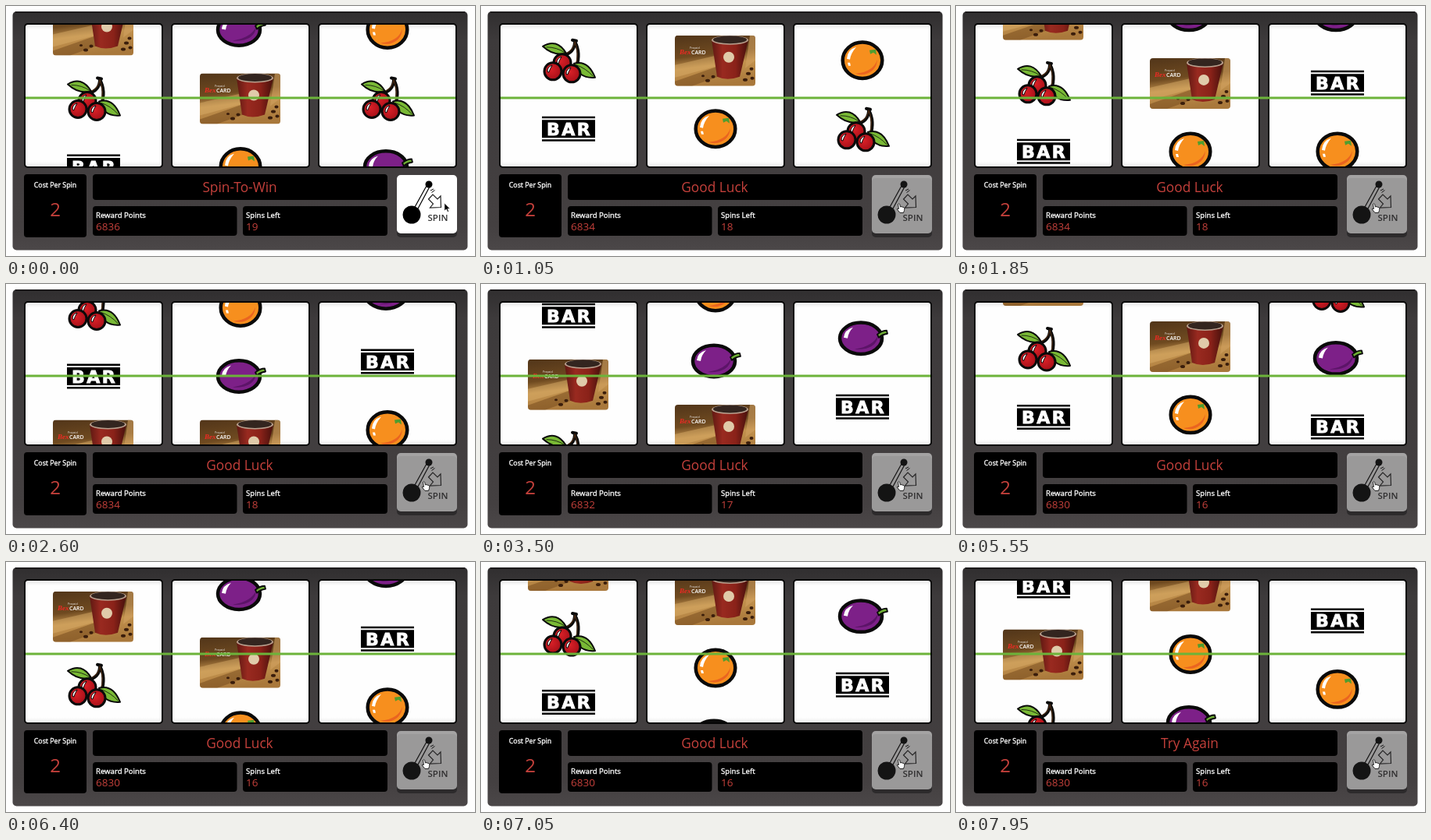
These frames come from a looping animation (600 px wide and 321 px high, 8000 ms). An HTML page:

```html
<!DOCTYPE html>
<html lang="en">
<head>
<meta charset="utf-8">
<title>Slot machine</title>
<style>
  html, body { margin: 0; width: 100%; height: 100%; overflow: hidden; background: #fefefe; }
  svg { display: block; width: 600px; height: 321px; }
  text { font-family: "Open Sans", sans-serif; }
  .label { fill: #fff; stroke: #fff; stroke-width: .35; font-size: 9.6px; }
  .value { fill: #c4403b; font-size: 13.5px; }
  .mid { text-anchor: middle; }
  .ink { stroke: #0a0a0a; stroke-linejoin: round; stroke-linecap: round; }
</style>
</head>
<body>
<svg viewBox="0 0 600 321">
  <defs>
    <linearGradient id="metal" x2="0" y2="1">
      <stop offset="0" stop-color="#302e2f"/><stop offset=".12" stop-color="#3d3a3b"/>
      <stop offset=".9" stop-color="#444041"/><stop offset="1" stop-color="#4b4748"/>
    </linearGradient>
    <linearGradient id="pane" x2="0" y2="1">
      <stop offset="0" stop-color="#e4e4e4"/><stop offset=".04" stop-color="#fefefe"/>
      <stop offset=".96" stop-color="#fefefe"/><stop offset="1" stop-color="#ebebeb"/>
    </linearGradient>
    <linearGradient id="table" x1=".2" x2=".4" y2="1">
      <stop offset="0" stop-color="#54371a"/><stop offset=".4" stop-color="#6f4a20"/>
      <stop offset=".62" stop-color="#c2924e"/><stop offset="1" stop-color="#a9783b"/>
    </linearGradient>
    <linearGradient id="paper">
      <stop offset="0" stop-color="#5e1812"/><stop offset=".3" stop-color="#992a20"/>
      <stop offset=".65" stop-color="#8a2219"/><stop offset="1" stop-color="#45100c"/>
    </linearGradient>
    <radialGradient id="red" cx=".4" cy=".4" r=".65">
      <stop offset="0" stop-color="#d92027"/><stop offset="1" stop-color="#a50f18"/>
    </radialGradient>
    <clipPath id="windows">
      <rect x="25" y="24" width="174" height="182" rx="3"/>
      <rect x="213" y="24" width="174" height="182" rx="3"/>
      <rect x="401" y="24" width="174" height="182" rx="3"/>
    </clipPath>
    <clipPath id="cardEdge"><rect x="-52" y="-32" width="103" height="65" rx="4"/></clipPath>

    <g id="bar">
      <path d="M-34-16h68v2.500h-68zM-34-11.500h68v23h-68zM-34 13.500h68V16h-68z"/>
      <text class="mid" x="1" y="8" fill="#fff" stroke="#fff" stroke-width=".9" font-size="22" font-weight="700" letter-spacing="2.500" style="font-family:'DejaVu Sans',sans-serif">BAR</text>
    </g>

    <g id="ball">
      <circle class="ink" r="11" fill="url(#red)" stroke-width="3"/>
      <path d="M-7 0Q-7-6-1-7.500Q-4-3-5 1z" fill="#fff"/>
    </g>
    <g id="cherry" class="ink">
      <path d="M-7-6Q8-10 8-24Q16-10 10 9" fill="none" stroke-width="4"/>
      <path d="M5-26L10-25" stroke-width="4"/>
      <path d="M-8-7Q7-12 8-24Q14-9 9 7" fill="none" style="stroke:#4a2a12" stroke-width="1.200"/>
      <path d="M-33-18Q-15-29-3-9Q-19-5-33-18z" fill="#79b935" stroke-width="2"/>
      <path d="M7 4Q25-1 34 22Q13 24 7 4z" fill="#79b935" stroke-width="2"/>
      <path d="M-28-17Q-15-17-5-10M10 6Q22 10 31 20" fill="none" stroke-width=".8"/>
      <use href="#ball" x="-8" y="3"/><use href="#ball" x="-20" y="14"/><use href="#ball" x="4" y="17"/>
    </g>

    <g id="orange">
      <ellipse class="ink" rx="25.300" ry="23.200" fill="#f78f1e" stroke-width="4.500"/>
      <path d="M19-1Q18 14 3 18Q-4 19-9 17Q14 15 19-1z" fill="#ea6420"/>
      <path d="M-20-2Q-19-14-8-17Q-15-9-16-1zM-19 3h3l1 4h-3z" fill="#fff"/>
      <path d="M9-13l8-1 1 7-4-3-4 2z" fill="#4f9d2f"/>
    </g>

    <g id="plum">
      <ellipse class="ink" cx="-2" rx="27" ry="20.200" fill="#7d2088" stroke-width="4.500"/>
      <path d="M20-4Q19 9 5 13Q-4 15-10 14Q14 10 20-4z" fill="#5c1468"/>
      <path d="M-24-1Q-23-11-12-14Q-18-8-19 0z" fill="#fff"/>
      <path class="ink" d="M19-5Q25-10 31-10l1 4Q25-5 21-1z" fill="#6fae35" stroke-width="1.800"/>
    </g>

    <g id="card" clip-path="url(#cardEdge)">
      <path d="M-52-32H51V33H-52z" fill="url(#table)"/>
      <path d="M-52 6L0-6V8L-52 22z" fill="#dcb06a" opacity=".45"/>
      <path d="M2 8L-52 27V33H-30L6 20z" fill="#6b4118" opacity=".45"/>
      <path d="M44-32H51V0L38 10z" fill="#d0a060" opacity=".6"/>
      <path d="M-5-26L2 21Q15 27 31 21L42-26z" fill="url(#paper)"/>
      <ellipse cx="18.500" cy="-26" rx="23.500" ry="6" fill="#b9a08e"/>
      <ellipse cx="18.500" cy="-26.500" rx="21.500" ry="5" fill="#33251f"/>
      <circle cx="17" cy="-4" r="7" fill="#e0cbaa"/>
      <g fill="#3a1d0b">
        <ellipse cx="42" cy="17" rx="3" ry="2"/><ellipse cx="46" cy="11" rx="2.500" ry="2"/>
        <ellipse cx="38" cy="25" rx="3" ry="2"/><ellipse cx="47" cy="23" rx="2.500" ry="2"/>
        <ellipse cx="-10" cy="26" rx="3" ry="2"/><ellipse cx="-3" cy="21" rx="2.500" ry="2"/>
        <ellipse cx="-16" cy="20" rx="2" ry="1.500"/>
      </g>
      <text x="-46" y="-8" font-size="9" font-weight="700" font-style="italic" fill="#ee2a24" style="font-family:'Liberation Serif',serif">Bex</text>
      <text x="-31" y="-8" font-size="7" font-weight="600" fill="#fff">CARD</text>
      <text x="-33" y="-15" font-size="3.500" fill="#eee">Prepaid</text>
    </g>
  </defs>

  <rect x="8.500" y="7" width="582" height="306.500" rx="5" fill="url(#metal)"/>
  <path d="M12 8H587" stroke="#1d1b1c" stroke-width="2"/>
  <g fill="url(#pane)" stroke="#060606" stroke-width="2">
    <rect x="24" y="23" width="176" height="184" rx="4"/>
    <rect x="212" y="23" width="176" height="184" rx="4"/>
    <rect x="400" y="23" width="176" height="184" rx="4"/>
  </g>
  <g id="reels" clip-path="url(#windows)"></g>
  <path d="M25 118H575" stroke="#6cb33a" stroke-width="3"/>

  <rect x="23" y="216" width="80" height="81" rx="4"/>
  <rect x="111" y="216" width="377" height="33" rx="4"/>
  <rect x="111" y="257" width="184.500" height="38" rx="4"/>
  <rect x="303" y="257" width="185" height="38" rx="4"/>
  <text class="label mid" x="63" y="233" style="font-size:8.8px">Cost Per Spin</text>
  <text class="value mid" x="63" y="270" style="font-size:24px">2</text>
  <text class="value mid" x="299" y="239" id="message" style="font-size:17.300px"></text>
  <text class="label" x="115" y="272">Reward Points</text>
  <text class="value" x="115" y="288" id="points"></text>
  <text class="label" x="307" y="272">Spins Left</text>
  <text class="value" x="307" y="288" id="spins"></text>

  <rect x="500" y="221" width="77" height="76" rx="5" fill="#2c2a2b"/>
  <g id="button">
    <rect x="500" y="217" width="77" height="75" rx="5" fill="#fff"/>
    <path d="M538.500 230L522 260M542.500 231L526 262" stroke="#000" stroke-width="1.200"/>
    <circle cx="541" cy="229" r="4.500"/><circle cx="519" cy="268" r="11.500"/>
    <path d="M543 237l4-2M544.500 239.500l4-3" stroke="#000"/>
    <path d="M540.500 248l5.500-6 6 6 4-4 .5 14.500-14 .5 4-5z" fill="#fff" stroke="#222" stroke-width="1.200"/>
    <text x="539.500" y="276" font-size="11.500" font-weight="600" fill="#333">SPIN</text>
  </g>
  <path id="arrow" d="M0 0V10L2.500 8 4 11.500 5.700 10.800 4.200 7.500H7.300z" stroke="#fff" stroke-width=".7"/>
  <path id="hand" transform="translate(532 253.500)" d="M1.500 1Q3-.5 3.700 1L4.500 4.500 6 4 7.300 4.700 9 5Q10.500 6 9.500 9L8.500 12H4L.3 7.500Q0 6 2.500 7z" fill="#fff" stroke="#111" stroke-width=".9"/>
</svg>
<script>
const LOOP = 8000, PITCH = 88, CENTRE = 118.5, SPEED = 4 / 150; // symbols per ms
const STARTS = [284, 2850, 5450], RESULT_DELAY = 2480;
const byId = id => document.getElementById(id);
const mod = (a, n) => ((a % n) + n) % n;

// Each spin lists [time, strip position]; the last point is where the reel stops.
const reels = [
  { x: 112, strip: ["cherry", "bar", "card"], spins: [
    [[1050, 2.42], [1850, 2.75], [1934, 2]],
    [[3500, 1.09], [4500, 0]],
    [[6400, .42], [7100, 1]]] },
  { x: 300, strip: ["card", "orange", "plum"], spins: [
    [[1050, 2.42], [1850, 2.75], [2334, 1]],
    [[3500, .75], [4550, 2.75], [4900, 0]],
    [[6400, .09], [7500, 2]]] },
  { x: 488, strip: ["cherry", "plum", "bar", "orange"], spins: [
    [[1050, .42], [1850, 1.75], [2834, 0]],
    [[3500, 2.42], [4550, 1.75], [5400, 0]],
    [[6400, 1.75], [7950, 1.5], [8000, 2]]] }
];

// Unroll strip positions into travelled distance, with whole turns nearest to SPEED.
for (const reel of reels) {
  const turn = reel.strip.length;
  reel.path = [[0, 0]];
  reel.spins.forEach((points, i) => {
    let [, travelled] = reel.path.at(-1), time = STARTS[i];
    reel.path.push([time, travelled]);
    for (const [t, position] of points) {
      const shift = position - mod(travelled, turn);
      travelled += shift + turn * Math.round(((t - time) * SPEED - shift) / turn);
      time = t;
      reel.path.push([t, travelled]);
    }
  });
  reel.uses = reel.strip.map(name => {
    const use = document.createElementNS("http://www.w3.org/2000/svg", "use");
    use.setAttribute("href", "#" + name);
    return byId("reels").appendChild(use);
  });
}

function along(path, t) {
  const i = path.findIndex(([time]) => time > t);
  if (i < 0) return path.at(-1)[1];
  const [t0, a] = path[i - 1], [t1, b] = path[i];
  return a + (b - a) * (t - t0) / (t1 - t0);
}

function draw(t) {
  for (const { x, path, uses } of reels) {
    const travelled = along(path, t), n = uses.length;
    uses.forEach((use, i) => {
      const y = CENTRE + PITCH * (mod(i + travelled + n / 2, n) - n / 2);
      use.setAttribute("transform", `translate(${x} ${y})`);
    });
  }
  const played = STARTS.filter(start => t >= start).length;
  const sinceStart = t - STARTS[played - 1];
  byId("message").textContent = !played ? "Spin-To-Win" : sinceStart < RESULT_DELAY ? "Good Luck" : "Try Again";
  byId("points").textContent = 6836 - 2 * played;
  byId("spins").textContent = 19 - played;
  byId("button").setAttribute("opacity", played ? .52 : 1);

  const move = Math.min(t / 200, 1), hovering = t >= 200;
  byId("arrow").setAttribute("transform", `translate(${561 - 27 * move} ${253 + move})`);
  byId("arrow").setAttribute("visibility", hovering ? "hidden" : "visible");
  byId("hand").setAttribute("visibility", hovering ? "visible" : "hidden");
}

const begin = performance.now();
function tick() {
  draw((performance.now() - begin) % LOOP);
  requestAnimationFrame(tick);
}
tick();
</script>
</body>
</html>
```
